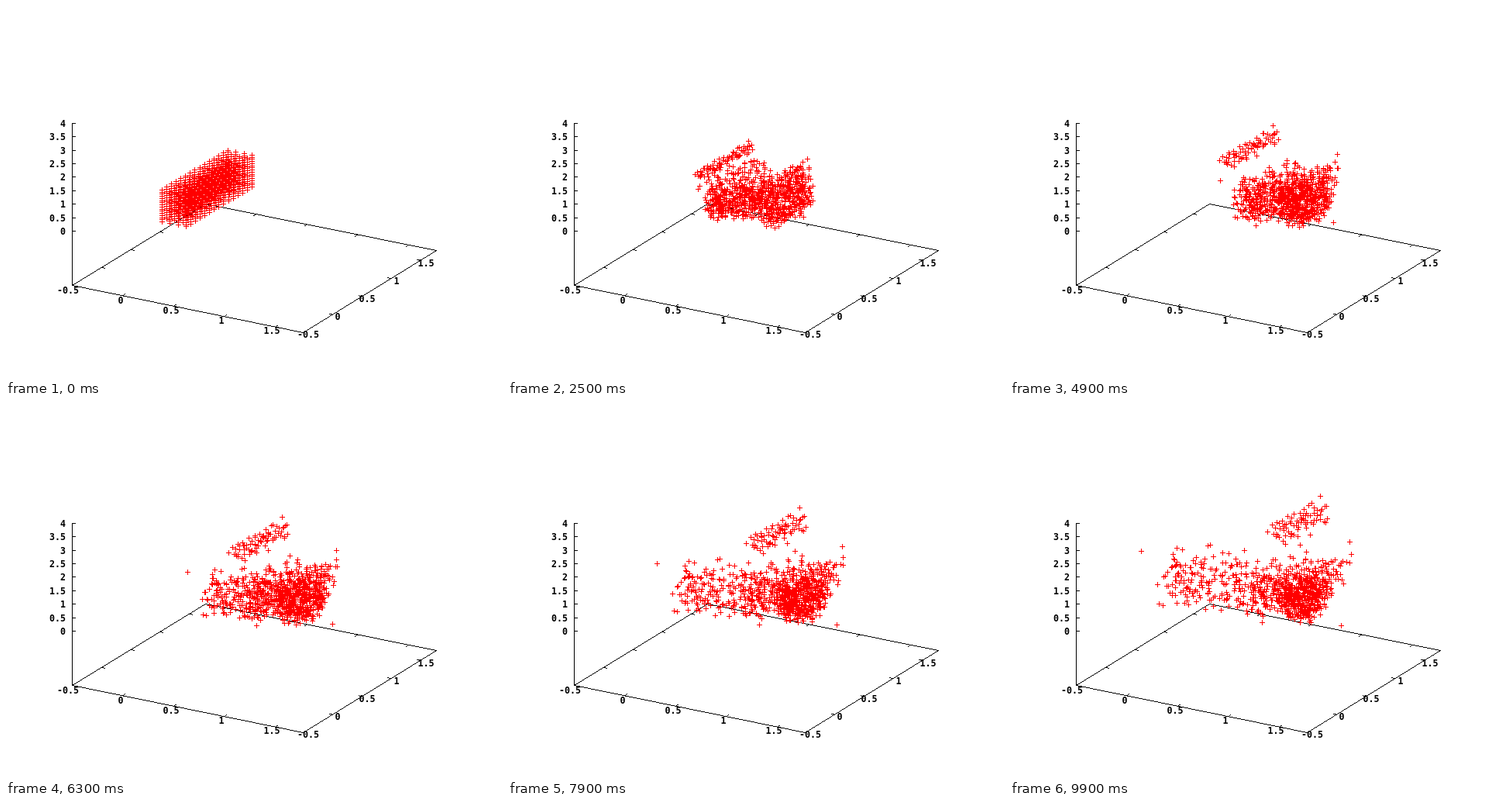
Recreate the animation shown at these times as an HTML page with a canvas. Size 640x480 px, loop 10 s.

```html
<!DOCTYPE html>
<html>
<head>
<meta charset="utf-8">
<style>
html, body { margin: 0; width: 100%; height: 100%; overflow: hidden; background: #fff; }
canvas { display: block; }
</style>
</head>
<body>
<canvas id="plot" width="640" height="480"></canvas>
<script>
const ctx = document.getElementById('plot').getContext('2d');
const STEPS = 100, RELEASE = 16;
const lerp = (a, b, t) => a + (b - a) * t;
const mix = (p, q, t) => [lerp(p[0], q[0], t), lerp(p[1], q[1], t)];

let seed = 20071;
function random() {
  seed = (seed * 1664525 + 1013904223) % 4294967296;
  return seed / 4294967296;
}
const gauss = () => (random() + random() + random() - 1.5) * 2;

// Each part of the fluid is a drifting sheet: its centre follows a path of
// [step, x, y], its two edges turn from one vector to another, its top flares.
const front = {
  path: [[0, 270, 235], [33, 382, 250], [99, 381, 243]],
  wide: [[58, -36], [56, -17]], tall: [[-24, -46], [3, -50]], flare: [70, -35], calm: 1
};
const rear = {
  path: [[0, 247, 231], [52, 346, 243], [99, 348, 237]],
  wide: [[68, -36], [78, -12]], tall: [[-6, -44], [-10, -46]], flare: [0, 0], calm: 1
};
const wash = {
  path: [[0, 247, 258], [49, 331, 251], [79, 268, 238], [99, 254, 226]],
  wide: [[45, 0], [100, 0]], tall: [[0, -24], [0, -50]], flare: [0, 0], calm: 1
};
const crest = {
  path: [[0, 247, 217], [99, 373, 151]],
  wide: [[68, -40], [62, -30]], tall: [[-4, -4], [-10, -18]], flare: [0, 0], calm: 0.6
};

function along(path, step) {
  let n = 1;
  while (n < path.length - 1 && step > path[n][0]) n++;
  const [a, b] = [path[n - 1], path[n]];
  return mix(a.slice(1), b.slice(1), (step - a[0]) / (b[0] - a[0]));
}

function makeParticle(i, j, k) {
  let sheet = front, low = 0, high = 15;
  if (i < 2) {
    if (k < 6) { sheet = wash; high = 5; }
    else if (i === 0 && k > 10) { sheet = crest; low = 11; }
    else { sheet = rear; low = 6; high = i ? 15 : 10; }
  }
  const reach = sheet.calm * Math.min(2.5, 0.8 * random() ** -0.25);
  const nx = gauss() * reach, ny = gauss() * reach;
  return {
    sheet,
    home: [201 + 10.3 * i + 6.07 * j, 278 + 2.1 * i - 3.65 * j - 2.75 * k],
    v: j / 14 - 0.5,
    w: (k - low) / (high - low) - 0.5,
    side: sheet === crest ? 0 : i % 2 - 0.5,
    // the walls and the floor hold the scatter back
    noise: [nx > 0 ? nx * 0.7 : nx, ny > 0 ? ny * 0.6 : ny]
  };
}

const particles = [];
for (let i = 0; i < 4; i++)
  for (let j = 0; j < 15; j++)
    for (let k = 0; k < 16; k++) particles.push(makeParticle(i, j, k));

function place({ sheet, home, v, w, side, noise }, step) {
  const t = step / (STEPS - 1);
  const centre = along(sheet.path, step);
  const wide = mix(...sheet.wide, t), tall = mix(...sheet.tall, t);
  const scatter = 14 * t - 4.5 * t * t;
  const shape = centre.map((c, n) =>
    c + v * wide[n] + w * tall[n] + v * w * t * sheet.flare[n] +
    side * [10, 2][n] + noise[n] * scatter);
  return mix(home, shape, Math.min(1, step / RELEASE)).map(Math.round);
}

function line(x0, y0, x1, y1) {
  const n = Math.max(Math.abs(x1 - x0), Math.abs(y1 - y0), 1);
  for (let s = 0; s <= n; s++)
    ctx.fillRect(Math.round(lerp(x0, x1, s / n)), Math.round(lerp(y0, y1, s / n)), 1, 1);
}

function label(text, x, y, align = 'center') {
  ctx.textAlign = align;
  ctx.fillText(text, x, y + 4);
}

function drawAxes() {
  const left = [85, 360], near = [383, 421], right = [555, 315], back = [257, 255];
  const tick = ([x, y], dx, dy) => line(x, y, x + dx, y + dy);
  ctx.fillStyle = '#000';
  ctx.font = 'bold 11.65px "DejaVu Sans Mono", monospace';
  line(...left, ...near);
  line(...near, ...right);
  line(...right, ...back);
  line(...back, ...left);
  line(...left, 85, 151);
  for (let n = 0; n <= 8; n++) {
    const y = Math.round(290 - n * 17.4);
    line(85, y, 89, y);
    label(n / 2, 77, y + 1, 'right');
  }
  for (let n = 0; n < 5; n++) {
    const text = n / 2 - 0.5, t = n / 4.55;
    if (n) {
      tick(mix(left, near, t), 3, -2);
      tick(mix(back, right, t), -3, 2);
      tick(mix(near, right, t), -4, -1);
      tick(mix(left, back, t), 4, 1);
    }
    label(text, 80 + (n ? 3 : 0) + 65 * n, 367 + 13 * n);
    label(text, 390 + 38 * n, 424 - 23 * n);
  }
}

function draw(step) {
  ctx.fillStyle = '#fff';
  ctx.fillRect(0, 0, 640, 480);
  drawAxes();
  ctx.fillStyle = '#f00';
  for (const particle of particles) {
    const [x, y] = place(particle, step);
    ctx.fillRect(x - 3, y, 7, 1);
    ctx.fillRect(x, y - 3, 1, 7);
  }
}

function tick() {
  draw(Math.floor(performance.now() / 100) % STEPS);
  requestAnimationFrame(tick);
}
tick();
</script>
</body>
</html>
```
